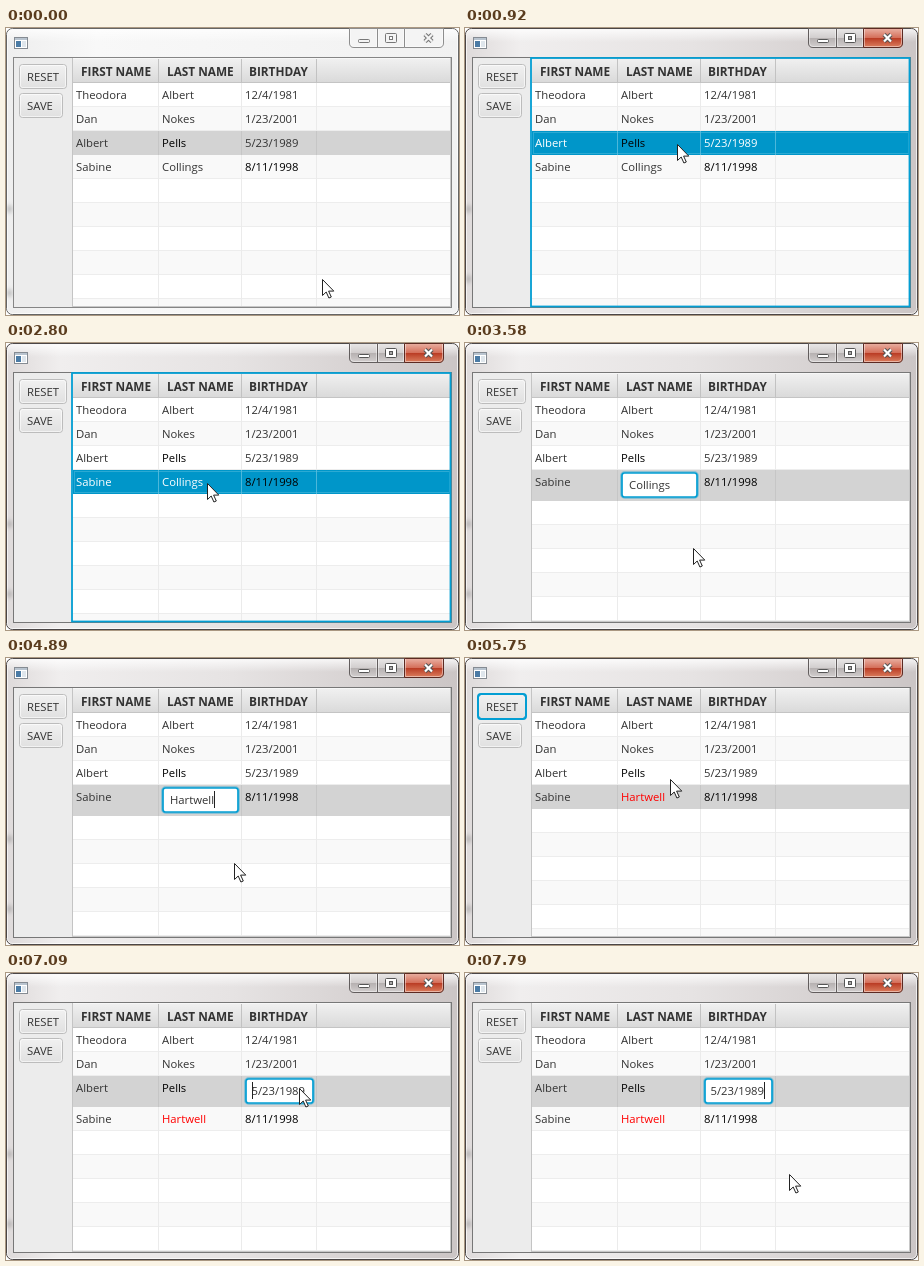
These frames come from a looping animation (453 by 287 pixels, 8000 ms). An HTML page:

```html
<!DOCTYPE html>
<html lang="en">
<head>
<meta charset="utf-8">
<title>Editable table</title>
<style>
  html, body { margin: 0; width: 100%; height: 100%; overflow: hidden; background: #fff; }
  svg { display: block; width: 453px; height: 287px; }
  text { font: 11.3px "Open Sans", "Noto Sans", sans-serif; fill: #333; white-space: pre; }
  .head { font-size: 11.8px; font-weight: 700; }
</style>
</head>
<body>
<svg id="stage" viewBox="0 0 453 287" xmlns="http://www.w3.org/2000/svg">
  <defs>
    <linearGradient id="idle"><stop stop-color="#eeeeee"/><stop offset=".2" stop-color="#f8f8f8"/><stop offset="1" stop-color="#f1f1f1"/></linearGradient>
    <linearGradient id="active"><stop stop-color="#dedada"/><stop offset=".12" stop-color="#f0eeee"/><stop offset=".5" stop-color="#e6e3e3"/><stop offset="1" stop-color="#cbc5c5"/></linearGradient>
    <linearGradient id="gloss" x2="0" y2="1"><stop stop-color="#fff" stop-opacity=".75"/><stop offset="1" stop-color="#fff" stop-opacity="0"/></linearGradient>
    <linearGradient id="header" x2="0" y2="1"><stop stop-color="#f1f1f1"/><stop offset="1" stop-color="#d9d9d9"/></linearGradient>
    <linearGradient id="button" x2="0" y2="1"><stop stop-color="#f1f1f1"/><stop offset="1" stop-color="#e0e0e0"/></linearGradient>
    <linearGradient id="grey" x2="0" y2="1"><stop stop-color="#e9e7e7"/><stop offset=".48" stop-color="#d2cece"/><stop offset=".5" stop-color="#b5b0b0"/><stop offset="1" stop-color="#d3cfcf"/></linearGradient>
    <linearGradient id="red" x2="0" y2="1"><stop stop-color="#e9b0a2"/><stop offset=".48" stop-color="#d5705b"/><stop offset=".5" stop-color="#b93a22"/><stop offset="1" stop-color="#dc8060"/></linearGradient>
    <filter id="soft" x="-100%" y="-100%" width="300%" height="300%"><feGaussianBlur stdDeviation="2"/></filter>
    <clipPath id="tableClip"><rect x="67" y="30" width="378" height="249"/></clipPath>
  </defs>
  <g id="scene"></g>
  <path id="cursor" d="M.5 .5V16.5L4.2 13L6.9 19L9.3 18L6.6 12.1H11.8Z" fill="#fff" stroke="#222" stroke-width="1"/>
</svg>
<script>
const LOOP = 8000, BLUE = '#0096c9', RING = '#039ed3';
const COLS = [67, 153, 236, 311];
const ROWS = [
  ['Theodora', 'Albert', '12/4/1981'],
  ['Dan', 'Nokes', '1/23/2001'],
  ['Albert', 'Pells', '5/23/1989'],
  ['Sabine', 'Collings', '8/11/1998']
];
const NEW_NAME = 'Hartwell';
const KEY_TIMES = [4130, 4210, 4360, 4510, 4590, 4660, 4740, 4890];
const SELECTED = [[0, 2], [1070, 1], [1390, 3], [2020, 2], [2720, 3], [6200, 2]];

// start, end, number of jumps, points passed
const MOVES = [
  [70, 300, 4, [198, 86]],
  [620, 770, 3, [212, 116]],
  [1000, 1390, 6, [206, 92], [201, 141]],
  [1700, 1920, 4, [195, 107]],
  [2170, 2240, 2, [142, 140]],
  [2410, 2480, 2, [231, 141]],
  [2650, 2800, 3, [201, 140]],
  [3100, 3260, 3, [228, 205]],
  [5590, 5980, 6, [250, 160], [160, 81], [190, 100]],
  [6130, 6280, 3, [219, 105]],
  [6450, 6680, 4, [268, 115]],
  [6850, 6920, 2, [293, 115]],
  [7160, 7390, 4, [314, 180]],
  [7560, 7710, 3, [324, 201]]
];

const scene = document.getElementById('scene');
const cursor = document.getElementById('cursor');
const pen = document.createElement('canvas').getContext('2d');

const within = (t, a, b) => t >= a && t < b;
const rect = (x, y, w, h, fill, more = '') => `<rect x="${x}" y="${y}" width="${w}" height="${h}" fill="${fill}" ${more}/>`;
const path = (d, stroke, more = '') => `<path d="${d}" fill="none" stroke="${stroke}" ${more}/>`;
const text = (x, y, s, more = '') => `<text x="${x}" y="${y}" ${more}>${s}</text>`;
const widthOf = s => {
  pen.font = '11.3px "Open Sans", "Noto Sans", sans-serif';
  return pen.measureText(s).width;
};

function cursorAt(t) {
  let at = [316, 251];
  for (const [start, end, jumps, ...points] of MOVES) {
    if (t < start) break;
    const done = Math.min(jumps, Math.floor((t - start) / (end - start) * (jumps - 1) + 1e-6) + 1);
    const route = [at, ...points], pos = done / jumps * points.length;
    const i = Math.min(points.length - 1, Math.floor(pos)), f = pos - i;
    at = route[i].map((v, k) => Math.round(v + (route[i + 1][k] - v) * f));
  }
  return at;
}

function stateAt(t) {
  const s = {
    active: t >= 450,
    tableFocus: within(t, 450, 3030) || within(t, 6200, 7090),
    resetFocus: within(t, 5060, 6200),
    row: SELECTED.filter(e => t >= e[0]).pop()[1],
    renamed: t >= 5060,
    edit: null
  };
  if (within(t, 3030, 5060)) {
    const typed = KEY_TIMES.filter(k => t >= k).length;
    const value = typed ? NEW_NAME.slice(0, typed) : ROWS[3][1];
    s.edit = { row: 3, col: 1, value, caret: typed, marked: within(t, 4040, KEY_TIMES[0]), blink: within(t, 3580, 4040) };
  } else if (t >= 7090) {
    s.edit = { row: 2, col: 2, value: ROWS[2][2], caret: t >= 7790 ? 9 : 0 };
  }
  return s;
}

function frame(active) {
  const edge = active ? '#4b4646' : '#656565', line = active ? '#625d5d' : '#8d8d8d';
  const glyph = active ? '#fff' : '#f4f4f4', ink = active ? '#555' : '#777';
  let out = rect(.5, .5, 452, 286, `url(#${active ? 'active' : 'idle'})`, `rx="6" stroke="${edge}"`);
  out += rect(2, 2, 449, 12, 'url(#gloss)', 'rx="4"');
  out += rect(1.5, 1.5, 450, 284, 'none', 'rx="5" stroke="#fff" stroke-opacity=".7"');
  for (const y of [181, active ? 251 : 265]) out += `<ellipse cx="3.5" cy="${y}" rx="2" ry="4" fill="#777" opacity=".55" filter="url(#soft)"/>`;

  out += rect(8.5, 9.5, 13, 11, '#fff', 'stroke="#858b92"') + rect(9, 10, 12, 2, '#b9c4cf') + rect(10, 13, 5, 6, '#4b7ba5') + rect(16, 13, 4, 6, '#dfe6ec');

  const fill = active ? 'url(#grey)' : '#f4f4f4';
  out += `<path d="M343.5 .5V15Q343.5 19.5 348 19.5H398.5V.5Z" fill="${fill}" stroke="${line}"/>`;
  out += `<path d="M398.5 .5V19.5H433Q437.5 19.5 437.5 15V.5Z" fill="${active ? 'url(#red)' : fill}" stroke="${active ? '#5c2a22' : line}"/>`;
  out += path('M371.5 1V19', line);
  out += path('M344.5 1V15Q344.5 18.5 348 18.5H370.5V1M372.5 1V18.5H397.5V1M399.5 1V18.5H433Q436.5 18.5 436.5 15V1', '#fff', 'opacity=".45"');
  out += rect(352.5, 11.5, 11, 3, glyph, `rx="1" stroke="${ink}"`);
  out += rect(379.5, 5.5, 11, 9, glyph, `rx="1" stroke="${ink}"`) + rect(383.5, 8.5, 3, 3, active ? '#aaa' : '#fff', `stroke="${ink}"`);
  const cross = 'M419 6.5L426 13.5M426 6.5L419 13.5';
  out += path(cross, ink, 'stroke-width="4.4"') + path(cross, glyph, 'stroke-width="2.2"');
  return out + rect(7.5, 29.5, 438, 250, '#ececec', `stroke="${active ? '#777' : '#858585'}"`);
}

function button(y, w, label, focused) {
  let out = rect(13.5, y + .5, w, 24, 'url(#button)', `rx="3" stroke="${focused ? RING : '#bcbcbc'}"`);
  if (focused) out += rect(13, y, w + 1, 25, 'none', `rx="3" stroke="${RING}" stroke-width="2"`);
  else out += rect(14.5, y + 1.5, w - 2, 22, 'none', 'rx="2" stroke="#fff" stroke-opacity=".6"');
  return out + text(21, y + 17, label);
}

function editor(e, top) {
  const x = COLS[e.col] + 3, w = e.col === 1 ? 77 : 69, tx = e.col === 1 ? 164 : 245.5;
  const caret = tx + widthOf(e.value.slice(0, e.caret));
  let out = rect(x, top + 3, w, 26, 'none', `rx="4" stroke="${RING}" stroke-opacity=".35" stroke-width="2"`);
  out += rect(x + 1, top + 4, w - 2, 24, '#fff', `rx="2.5" stroke="${RING}" stroke-width="1.7"`);
  if (e.marked) out += rect(tx, top + 7, widthOf(e.value), 17, BLUE);
  out += text(tx, top + 20, e.value, e.marked ? 'style="fill:#fff"' : '');
  if (!e.blink && !e.marked) out += rect(Math.round(caret), top + 7, 1, 17, '#222');
  return out;
}

function table(s) {
  let out = rect(67, 30, 378, 249, '#fff'), y = 55;
  for (let i = 0; y < 279; i++) {
    const editing = s.edit && s.edit.row === i, h = editing ? 31 : 24;
    const chosen = s.row === i, blue = chosen && s.tableFocus;
    const grid = blue ? '#4db7da' : chosen ? '#c6c6c6' : '#ebebeb';
    out += rect(67, y, 378, h, blue ? BLUE : chosen ? '#d3d3d3' : i % 2 ? '#f9f9f9' : '#fff');
    if (!chosen) out += rect(67, y + h - 1, 378, 1, '#ededed');
    for (const x of COLS.slice(1)) out += rect(x - 1, y, 1, h, grid);
    if (blue) out += rect(68.5, y + 1.5, 375, h - 3, 'none', 'stroke="#58bcdc" stroke-dasharray="1 1"');
    (ROWS[i] || []).forEach((value, col) => {
      if (editing && s.edit.col === col) return;
      const changed = i === 3 && col === 1 && s.renamed;
      const black = (i === 2 && col === 1) || (i === 3 && col === 2);
      const color = changed ? '#f00' : black ? '#000' : blue ? '#fff' : '#333';
      out += text(COLS[col] + 3, y + 16, changed ? NEW_NAME : value, `style="fill:${color}"`);
    });
    if (editing) out += editor(s.edit, y - 1);
    y += h;
  }
  out += rect(67, 30, 378, 25, 'url(#header)') + rect(67, 54, 378, 1, '#c4c4c4') + rect(67, 30, 378, 1, '#f7f7f7');
  for (const x of COLS.slice(1)) out += rect(x - 1, 31, 1, 24, '#c2c2c2');
  [[75, 'FIRST NAME'], [161, 'LAST NAME'], [243, 'BIRTHDAY']].forEach(([x, label]) => out += text(x, 48, label, 'class="head"'));
  out = `<g clip-path="url(#tableClip)">${out}</g>`;
  return out + (s.tableFocus
    ? rect(66, 30, 378.5, 248.5, 'none', `stroke="${RING}" stroke-width="1.8"`)
    : rect(66, 30, 1, 249, '#c4c4c4') + rect(444, 30, 1, 249, '#c8c8c8') + rect(66, 278, 379, 1, '#c8c8c8'));
}

let shown = '';
function draw(t) {
  const s = stateAt(t), key = JSON.stringify(s);
  if (key !== shown) {
    shown = key;
    scene.innerHTML = frame(s.active) + button(36, 47, 'RESET', s.resetFocus) + button(65, 43, 'SAVE', false) + table(s);
  }
  cursor.setAttribute('transform', `translate(${cursorAt(t)})`);
}

const began = performance.now();
function tick() {
  draw((performance.now() - began) % LOOP);
  requestAnimationFrame(tick);
}
tick();
</script>
</body>
</html>
```
